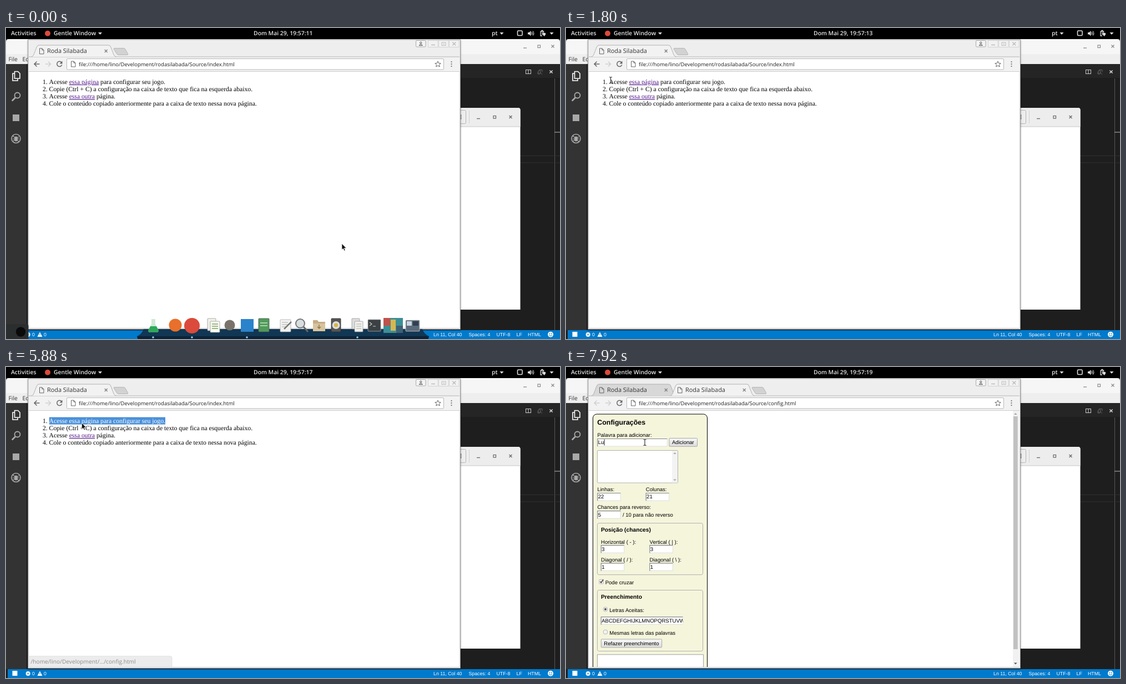
An HTML page that plays this animation: 998x561 px, repeating every 8 s.

```html
<!DOCTYPE html>
<html lang="pt">
<head>
<meta charset="utf-8">
<title>Desktop</title>
<style>
html, body { margin: 0; width: 100%; height: 100%; overflow: hidden; background: #000; }
svg { display: block; width: 100%; height: 100%; }
text { text-rendering: geometricPrecision; white-space: pre; }
.bar { font: 600 10.4px "Open Sans", sans-serif; fill: #e6e6e6; }
.ui { font: 10.9px "Open Sans", sans-serif; fill: #333; }
.menu { font: 10.4px "Open Sans", sans-serif; fill: #333; }
.url { font: 9.53px "Open Sans", sans-serif; fill: #222; }
.tip { font: 10.2px "Open Sans", sans-serif; fill: #8c8c8c; }
.page { font: 11.69px "Liberation Serif", serif; }
.link { fill: #551a8b; text-decoration: underline 0.75px; text-underline-offset: 1.3px; text-decoration-skip-ink: none; }
.form { font: 9.55px "Liberation Sans", sans-serif; }
.head { font: bold 10.24px "Liberation Sans", sans-serif; }
.title { font: bold 12.4px "Liberation Sans", sans-serif; }
.status { font: 8.77px "Liberation Sans", sans-serif; fill: #fff; }
</style>
</head>
<body>
<svg id="stage" viewBox="0 0 998 561" preserveAspectRatio="none"></svg>
<script>
const rect = (x, y, w, h, fill, extra = '') =>
  `<rect x="${x}" y="${y}" width="${w}" height="${h}" fill="${fill}" ${extra}/>`;
const circle = (x, y, r, fill, extra = '') =>
  `<circle cx="${x}" cy="${y}" r="${r}" fill="${fill}" ${extra}/>`;
const shape = (d, fill, extra = '') => `<path d="${d}" fill="${fill}" ${extra}/>`;
const stroke = (color, width = 1) => `stroke="${color}" stroke-width="${width}"`;
const line = (d, color, width = 1, extra = '') => shape(d, 'none', `${stroke(color, width)} ${extra}`);
const text = (cls, x, y, body, extra = '') =>
  `<text class="${cls}" x="${x}" y="${y}" ${extra}>${body}</text>`;
const group = (id, body, extra = '') => `<g id="${id}" ${extra}>${body}</g>`;
const cross = (x, y, r, color, width) =>
  line(`M${x - r} ${y - r}l${2 * r} ${2 * r}m0 ${-2 * r}l${-2 * r} ${2 * r}`, color, width);
const arrowDown = (x, y) => shape(`M${x} ${y}h7l-3.5 4z`, '#ddd');
const sheet = (x, y) => line(`M${x} ${y}h4.5l3 3v7h-7.5zM${x + 4.5} ${y}v3h3`, '#555', 0.9);
const windowKeys = (xs, y, color) =>
  line(`M${xs[0] - 3} ${y + 3}h6`, color, 1.3) +
  rect(xs[1] - 2, y - 2, 4.5, 4.5, 'none', stroke(color, 1.2)) +
  cross(xs[2], y, 2.5, color, 1.3);

const appName = 'Roda Silabada';
const folder = '/home/lino/Development/';
const address = page => `file://${folder}rodasilabada/Source/${page}.html`;

const topBar = () =>
  rect(0, 0, 998, 20, '#000') +
  text('bar', 9, 13.2, 'Activities') +
  circle(75, 9.7, 5, '#db4a3b') +
  text('bar', 86, 13.2, 'Gentle Window') + arrowDown(166, 8) +
  text('bar', 446, 13.2, '', 'id="clock"') +
  text('bar', 875, 13.2, 'pt') + arrowDown(889.5, 8) +
  rect(921.5, 5, 8.5, 8.5, 'none', stroke('#ddd', 1.6) + ' rx="1.5"') +
  shape('M940 8h2.5l3-3v9.5l-3-3h-2.5z', '#ddd') +
  line('M947 7q2 2.5 0 5M949 5.5q3.4 4 0 8', '#ddd', 1.1) +
  line('M963 6h5.5v3M963 6v8h3M964.5 4.5h2.5M965 8.5h2M965 11h2', '#ddd', 1.3) +
  shape('M967 9h5v3l-2.5 3-2.5-3z', '#ddd') + arrowDown(979.5, 8);

const editor = () =>
  rect(0, 20, 998, 541, '#1e1e1e') +
  shape('M0 25q0-5 5-5h988q5 0 5 5v22h-998z', '#f6f6f6') +
  rect(0, 47, 998, 18, '#eee') +
  text('menu', 4.5, 60, 'File') + text('menu', 29.5, 60, 'Edit') +
  windowKeys([935, 960, 985], 33, '#8b8b8b') +
  rect(0, 65, 37, 480, '#333') +
  rect(818, 65, 180, 25, '#252526') +
  rect(936.5, 75.5, 9, 7, 'none', stroke('#ccc')) + line('M941 75v8', '#ccc') +
  line('M958 79v4h4M960 75.5h6v4M962 80l4 4M959 77h4v5h-4z', '#5e5e5e') +
  cross(982, 79, 2.6, '#ddd', 1.4) +
  line('M988.5 91v454', '#666', 0.8) + line('M988 188h10', '#bbb') +
  line('M926 230.5h72M926 243h72', '#303030') +
  line('M15.5 78.5h6l3.5 3.5v9h-9.5zM15 82h-3v13h9v-3', '#fff', 1.6) +
  circle(20.5, 121.5, 5, 'none', stroke('#aaa', 1.8)) + line('M16.8 125.5l-6 6', '#aaa', 2.6) +
  rect(12, 156, 12, 12, '#a8a8a8') +
  circle(18, 199.5, 8, 'none', stroke('#aaa', 1.6)) +
  '<ellipse cx="18" cy="200" rx="3" ry="4.5" fill="#aaa"/>' +
  line('M12 194l12 12M12 200h12M13 204l10-8', '#aaa', 1.1);

const backWindow = () =>
  shape('M818 144h104.5q4 0 4 4v360h-108.5z', '#fff') +
  shape('M818 144h104.5q4 0 4 4v30h-108.5z', '#ededed') +
  line('M818 178h108.5', '#c6c6c6') +
  line('M818 148.5h8.5q2 0 2 2v20q0 2-2 2h-8.5', '#b5b5b5') +
  line('M818 157.5h2.5M818 160.5h2.5M818 163.5h2.5', '#555', 1.3) +
  line('M834.5 149v23', '#d0d0d0') +
  windowKeys([851, 880, 909], 160.5, '#666');

const statusBar = () =>
  rect(3, 545, 995, 16, '#007acc') +
  rect(11.5, 548, 9, 9, '#fff') +
  circle(39.7, 553, 4, '#fff') + cross(39.7, 553, 1.7, '#007acc', 1) +
  text('status', 47, 556, '0') +
  shape('M61 548.5l4.5 8.5h-9z', '#fff') + line('M61 551.5v3', '#007acc', 0.9) +
  text('status', 68, 556, '0') +
  [[770, 'Ln 11, Col 40'], [833.5, 'Spaces: 4'], [883.5, 'UTF-8'], [919.5, 'LF'], [940, 'HTML']]
    .map(([x, label]) => text('status', x, 556, label)).join('') +
  circle(981, 552.7, 5, '#fff') +
  circle(979.3, 551.5, 0.9, '#007acc') + circle(982.7, 551.5, 0.9, '#007acc') +
  line('M978 554q3 3 6 0', '#007acc');

const tabShape = (left, right) =>
  `M${left} 52q3-1 4-4l5-13q1.5-4 4-4H${right - 13}q3 0 4 4l5 13q1 3 4 4`;

const browserFrame = () =>
  rect(39.5, 22, 779.5, 523, '#000', 'opacity=".4" filter="url(#soft)"') +
  rect(39.8, 21, 778.6, 522.5, '#eee', stroke('#888', 0.8)) +
  rect(738.5, 22.5, 17.5, 11.5, '#f4f4f4', stroke('#999', 0.8) + ' rx="1.5"') +
  circle(747.3, 26.7, 1.6, 'none', stroke('#555')) + line('M744.3 31.5q3-5 6 0z', '#555') +
  [760.5, 779.5, 798.5].map(x => rect(x, 22.5, 17.5, 12, '#f2f2f2', stroke('#ccc', 0.8))).join('') +
  line('M766 30.5h7', '#bbb', 1.5) +
  rect(785, 26, 7, 5.5, 'none', stroke('#bbb')) + line('M787 29h3', '#bbb') +
  cross(807.3, 28.5, 3, '#bbb', 1.4) +
  rect(41, 52, 776, 26.5, '#f2f2f2') + line('M41 52h776', '#b4b4b4') +
  shape('M195 36.5h17q2 0 3 2l4.5 8q1 2-1 2h-16q-2 0-3-2l-5-8q-1-2 .5-2z', '#d2d2d2',
    'id="newTab" ' + stroke('#aaa', 0.8)) +
  shape(tabShape(46, 198), '#f2f2f2', 'id="tabOne" ' + stroke('#aaa', 0.9)) +
  sheet(60.5, 36.8) + text('ui', 74, 45.3, appName) + cross(180.2, 41.5, 2.5, '#777', 1.1) +
  group('tabTwo',
    shape('', '#f2f2f2', 'id="tabTwoShape" ' + stroke('#aaa', 0.9)) + sheet(201.5, 36.8) +
    `<g clip-path="url(#tabClip)">${text('ui', 215, 45.3, appName)}</g>` +
    rect(0, 35, 14, 13, 'url(#fade)', 'id="tabFade"') +
    group('tabClose', cross(180.2, 41.5, 2.5, '#777', 1.1))) +
  line('M60.5 65h-9M55.5 60.5l-4.5 4.5 4.5 4.5', '#666', 1.5, 'id="back"') +
  line('M71 65h9M76 60.5l4.5 4.5-4.5 4.5', '#d0d0d0', 1.5) +
  line('M100 62a4.6 4.6 0 1 0 .7 4.5', '#666', 1.5) + shape('M101.5 59.5v5h-5z', '#666') +
  rect(109.5, 55.5, 679, 19.5, '#fff', stroke('#b0b0b0', 0.9) + ' rx="1.5"') +
  sheet(117.5, 60) + text('url', 131, 68.6, '', 'id="url"') +
  line('M778 60l1.5 3.5 3.7.3-2.8 2.5.9 3.6-3.3-2-3.3 2 .9-3.6-2.8-2.5 3.7-.3z', '#555', 0.9) +
  [61, 65, 69].map(y => circle(802.5, y, 1.1, '#666')).join('') +
  rect(42, 79, 774, 462.5, '#fff') + line('M41 78.5h776', '#c4c4c4', 0.8) +
  line('M41.5 541.7h775', '#bbb', 0.8);

const link = label => `<tspan class="link">${label}</tspan>`;
const steps = [
  `Acesse ${link('essa página')} para configurar seu jogo.`,
  'Copie (Ctrl + C) a configuração na caixa de texto que fica na esquerda abaixo.',
  `Acesse ${link('essa outra')} página.`,
  'Cole o conteúdo copiado anteriormente para a caixa de texto nessa nova página.'
];
const listPage = () => group('listPage',
  steps.map((body, i) => {
    const y = 100.9 + i * 13.15;
    return text('page', 74.7, y, `${i + 1}.`, 'text-anchor="end"') + text('page', 77.6, y, body);
  }).join('') +
  `<g clip-path="url(#selClip)">${rect(77.6, 90.5, 209.4, 13.1, '#4a90d9')}` +
  text('page', 77.6, 100.9, steps[0].replace(/<[^>]+>/g, ''), 'fill="#fff"') + '</g>' +
  group('bubble', shape('M42 521.5h254q3 0 3 3v17h-257z', '#ececec', stroke('#dcdcdc', 0.7)) +
    text('tip', 44.5, 535.4, folder + '…/config.html')));

const label = (x, y, body) => text('form', x, y, body);
const field = (x, y, w, value = '') =>
  rect(x, y, w, 14.3, '#fff') +
  line(`M${x} ${y + 14}h${w}v-14`, '#dedede') +
  line(`M${x + 0.5} ${y + 14.3}v-13.8h${w - 0.5}`, '#858585', 1.2) +
  label(x + 1.4, y + 10.4, value);
const button = (x, y, w, body) =>
  rect(x, y, w, 14.8, 'url(#key)', stroke('#a0a0a0', 0.9) + ' rx="1"') +
  label(x + 5, y + 10.9, body);
const fieldset = (y, h, title) =>
  rect(56.5, y, 190, h, 'none', stroke('#a9a9a9', 0.9) + ' rx="3"') + text('head', 63, y + 15.6, title);
const radio = (y, on) =>
  circle(71, y, 4, '#f2f2f2', stroke('#aaa', 0.8)) + (on ? circle(71, y, 2, '#555') : '');
const scrollTip = (x, y, dir, color) => shape(`M${x - 2.8} ${y + dir}h5.6l-2.8 ${-3 * dir}z`, color);

const configPage = () => group('configPage',
  rect(48.5, 85, 206, 470, '#f5f5dc', stroke('#000') + ' rx="7"') +
  text('title', 56.3, 103.7, 'Configurações') +
  label(56.4, 126.3, 'Palavra para adicionar:') + field(56.3, 129, 126) +
  text('form', 57.7, 139.4, '', 'id="typed"') + rect(58, 130.5, 0.9, 11, '#000', 'id="caret"') +
  button(186, 128.5, 50.5, 'Adicionar') +
  rect(56.5, 150.5, 145, 58.5, '#fff', stroke('#a9a9a9', 0.9) + ' rx="1.5"') +
  rect(191, 151, 10, 57.5, '#f3f3f3') + scrollTip(196, 156, 1, '#aaa') + scrollTip(196, 203.5, -1, '#aaa') +
  label(56.4, 224.2, 'Linhas:') + field(56.3, 227, 42, '22') +
  label(143.8, 224.2, 'Colunas:') + field(143.7, 227, 42, '21') +
  label(56.4, 256.4, 'Chances para reverso:') + field(56.3, 259.2, 42, '5') +
  label(102, 269.6, '/ 10 para não reverso') +
  fieldset(281.7, 93, 'Posição (chances)') +
  [[318.5, 'Horizontal ( - ):', 'Vertical ( | ):', 3], [350.7, 'Diagonal ( / ):', 'Diagonal ( \\ ):', 1]]
    .map(([y, left, right, value]) =>
      label(63, y, left) + field(62.8, y + 2.7, 42, value) +
      label(150.6, y, right) + field(150.4, y + 2.7, 42, value)).join('') +
  rect(59.7, 383.3, 7.7, 7.7, '#f4f4f4', stroke('#aaa', 0.8) + ' rx="1"') +
  line('M61.3 387l2 2 3.8-5.5', '#444', 1.6) +
  label(70.7, 392, 'Pode cruzar') +
  fieldset(402.5, 110, 'Preenchimento') +
  radio(437, true) + label(78.3, 441.7, 'Letras Aceitas:') +
  `<g clip-path="url(#lettersClip)">${field(62.8, 450.4, 148, 'ABCDEFGHIJKLMNOPQRSTUVWXYZ')}</g>` +
  radio(478, false) + label(78.3, 483, 'Mesmas letras das palavras') +
  button(63.3, 491, 109.3, 'Refazer preenchimento') +
  rect(56.5, 518.8, 191, 40, '#fff', stroke('#999', 0.9)) +
  rect(805, 79, 10.5, 462, '#f1f1f1') + rect(806, 89, 7.7, 420, '#c1c1c1') +
  scrollTip(809.8, 85, 1, '#a3a3a3') + scrollTip(809.8, 534.5, -1, '#505050'),
  'clip-path="url(#pageClip)"');

const card = (x, y, w, h, fill, edge) => rect(x, y, w, h, fill, stroke(edge, 0.8) + ' rx="1"');
const dock = () => group('dock',
  shape('M248 543h502q3 9 12 13l-1 5h-524l-1-5q9-4 12-13z', '#12344f', 'opacity=".95"') +
  shape('M236 556h526l-2 5h-522z', '#0a2238') +
  shape('M262 525h7v9l5 10q2 5-3 5h-11q-5 0-3-5l5-10z', '#cfe8d4') +
  shape('M260 538h11l3 6q2 5-3 5h-11q-5 0-3-5z', '#2fa85a') +
  circle(305, 536, 11.5, '#e8702a') + circle(335, 537, 14, '#db4a3b') +
  card(363, 524, 15, 22, '#f1f1ea', '#999') + card(368, 529, 17, 20, '#fafaf5', '#999') +
  line('M371 534h11M371 538h11M371 542h11', '#79a35b', 1.6) +
  circle(403, 536, 9.5, '#77736a') + rect(423, 525, 23, 23, '#2b83cb') +
  card(455, 524, 19, 24, '#4f9b5b', '#555') + line('M458 532h13M458 537h13', '#a9d0a8', 2) +
  card(494, 526, 19, 22, '#f2f2f0', '#aaa') + line('M497 531h11M497 535h11M497 539h9', '#aaa') +
  line('M501 543l13-13', '#777', 2.5) +
  circle(530, 533, 8, '#d8dde0', stroke('#777', 2)) + line('M536 539l8 9', '#666', 3) +
  shape('M553 527h8l2 3h12v17h-22z', '#c4ad86') + rect(553, 533, 22, 14, '#d8c39d') +
  line('M564 535v7M561 539l3 3 3-3', '#8c7855', 1.5) +
  card(586, 524, 17, 24, '#555', '#333') + circle(594.5, 536, 7, '#ddd') + circle(594.5, 536, 3.5, '#d9b63c') +
  card(623, 524, 14, 19, '#ddd', '#999') + card(628, 529, 15, 19, '#f0f0ec', '#999') +
  line('M631 534h9M631 538h9M631 542h9', '#aaa') +
  card(652, 526, 23, 21, '#3b4143', '#aaa') + line('M655 531l4 3-4 3M661 538h5', '#ccc', 1.2) +
  rect(680, 523, 35, 27, '#3d8f96') + rect(680, 523, 12, 14, '#c0524a') +
  rect(693, 526, 9, 20, '#d9b74f') + rect(703, 537, 12, 13, '#3f5f75') +
  card(720, 527, 25, 20, '#5b6b7c', '#ccc') + rect(722, 529, 9, 8, '#c8d3df') + rect(733, 529, 10, 8, '#31404f') +
  [265, 335, 434, 633].map(x => circle(x, 558, 1.8, '#8fd2ff')).join(''));

const tray = () => group('tray',
  shape('M-10 534h68q4 0 4 4v23h-72z', '#2b2e2f') +
  line('M17 542.5l-5.5 5.5 5.5 5.5', '#fff', 2.2) + circle(48, 548, 8.7, '#0a0a0a'));

const beamPath = 'M-2.5-5.5q2.5 0 2.5 1.2v8.6q0 1.2-2.5 1.2M2.5-5.5q-2.5 0-2.5 1.2M0 4.3q0 1.2 2.5 1.2';
const pointers = () =>
  group('arrow', shape('M0 0v11l2.5-2.2 1.8 4 1.8-.8-1.8-3.9h3.6z', '#111', stroke('#fff', 0.6))) +
  group('beam', line(beamPath, '#fff', 2.2) + line(beamPath, '#222', 1.1)) +
  group('hand', shape('M-1 0q1.5-1 2 .5v4l5 1.2q1.5.5 1 2l-1 5.5h-6l-4-5q0-2 3 0z', '#fff', stroke('#111', 0.9)));

const stage = document.getElementById('stage');
stage.innerHTML = `<defs>
  <linearGradient id="key" x2="0" y2="1"><stop stop-color="#f8f8f8"/><stop offset="1" stop-color="#dcdcdc"/></linearGradient>
  <linearGradient id="fade"><stop stop-color="#f2f2f2" stop-opacity="0"/><stop offset="1" stop-color="#f2f2f2"/></linearGradient>
  <filter id="soft"><feGaussianBlur stdDeviation="1.5"/></filter>
  <clipPath id="selClip"><rect id="selection" x="77.6" y="88" width="0" height="18"/></clipPath>
  <clipPath id="tabClip"><rect id="tabRoom" x="213" y="32" width="50" height="19"/></clipPath>
  <clipPath id="lettersClip"><rect x="62" y="450" width="148.5" height="15"/></clipPath>
  <clipPath id="pageClip"><rect x="42" y="79" width="774" height="462"/></clipPath>
</defs>` + editor() + backWindow() + statusBar() + browserFrame() + listPage() + configPage() +
  dock() + tray() + topBar() + pointers();

const el = {};
stage.querySelectorAll('[id]').forEach(node => { el[node.id] = node; });
const set = (id, name, value) => el[id].setAttribute(name, value);
const move = (id, x, y) => set(id, 'transform', `translate(${x} ${y})`);
const show = (id, on) => set(id, 'visibility', on ? 'visible' : 'hidden');

// Each row: time, then values; linear in between.
const path = [[0, 605, 389], [240, 545, 371], [480, 432, 318], [720, 310, 240], [960, 204, 165],
  [1200, 126, 116], [1440, 90, 97], [1680, 80.5, 94], [2160, 80.5, 94], [2640, 116, 94],
  [3000, 190, 94], [3480, 288, 93], [3600, 296, 93], [4800, 296, 93], [5040, 262, 95],
  [5400, 172, 99], [5640, 136.5, 101], [6480, 136.5, 101], [6720, 140, 121], [6840, 142, 136]];
const traySlide = [[0, -21.5], [120, 0], [1440, 0], [1560, -8], [1680, -27], [1800, -64]];
const bubbleFade = [[2640, 0], [2880, 1], [3240, 1], [3480, 0], [5520, 0], [5640, 0.35], [5760, 1]];
const tabGrow = [[6000, 94], [6120, 130], [6240, 141]];
const clockTicks = [360, 1320, 2400, 3360, 4320, 5280, 6240, 7200];

function at(rows, t) {
  const next = rows.findIndex(row => row[0] > t);
  if (next < 0) return rows.at(-1).slice(1);
  if (next === 0) return rows[0].slice(1);
  const a = rows[next - 1], b = rows[next];
  const k = (t - a[0]) / (b[0] - a[0]);
  return a.slice(1).map((value, i) => value + (b[i + 1] - value) * k);
}

function pointerKind(t) {
  if (t >= 6840) return 'beam';
  if (t >= 5880 || t < 1440) return 'arrow';
  return t >= 5520 ? 'hand' : 'beam';
}

function render(t) {
  const [x, y] = at(path, t);
  const config = t >= 6000;
  const kind = pointerKind(t);
  for (const id of ['arrow', 'beam', 'hand']) show(id, id === kind);
  move(kind, x, y);

  el.clock.textContent = `Dom Mai 29, 19:57:${11 + clockTicks.filter(tick => t >= tick).length}`;
  show('dock', t < 240);
  move('dock', 0, t < 120 ? 0 : 22);
  move('tray', at(traySlide, t)[0], 0);
  show('tray', t < 1800);

  set('selection', 'width', t < 2280 ? 0 : t >= 3600 ? 210 : Math.max(0, x - 77.6));
  set('bubble', 'opacity', at(bubbleFade, t)[0]);
  show('listPage', !config);
  show('configPage', config);
  el.url.textContent = address(config ? 'config' : 'index');
  set('back', 'stroke', config ? '#d0d0d0' : '#666');

  const grow = config ? at(tabGrow, t)[0] : 0;
  show('tabTwo', config);
  set('tabOne', 'fill', config ? '#d8d8d8' : '#f2f2f2');
  set('tabTwoShape', 'd', tabShape(188, 198 + grow));
  set('tabRoom', 'width', Math.max(0, grow - 43));
  set('tabFade', 'x', 156 + grow);
  show('tabFade', config && t < 6240);
  move('tabClose', grow, 0);
  move('newTab', grow, 0);

  const typed = t >= 7920 ? 'Lu' : t >= 7680 ? 'L' : '';
  el.typed.textContent = typed;
  set('caret', 'x', 58 + [0, 6, 10.6][typed.length]);
  show('caret', config && (t < 6600 || t >= 7080));
}

const start = performance.now();
function tick() {
  const time = (performance.now() - start) % 8000;
  render(Math.floor(time / 120) * 120);
  requestAnimationFrame(tick);
}
tick();
</script>
</body>
</html>
```
